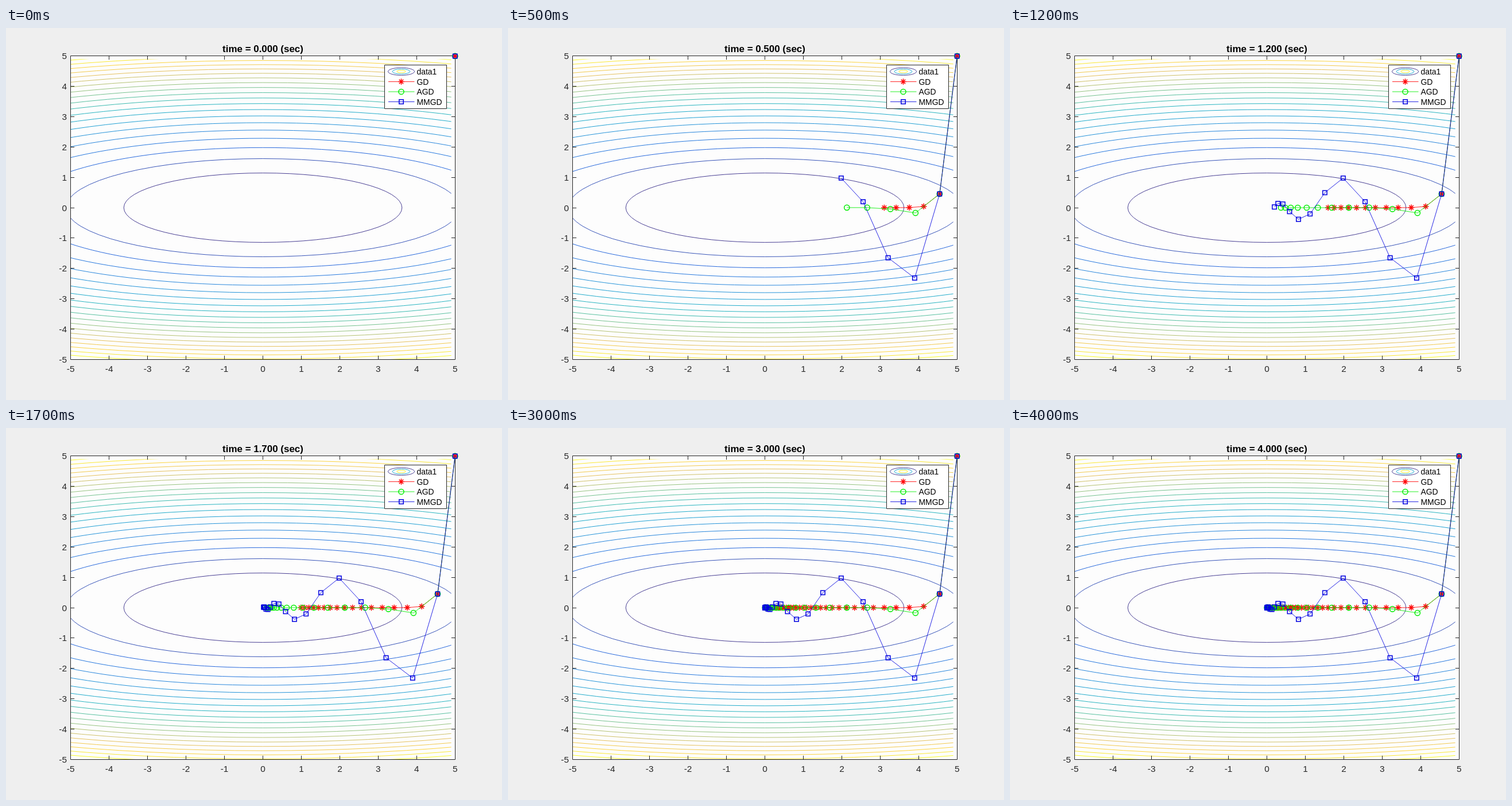
An HTML page with a canvas that plays this animation: 864 px wide and 648 px high, repeating every 4100 ms.

```html
<!DOCTYPE html>
<html lang="en">
<head>
<meta charset="utf-8">
<title>Gradient descent paths</title>
<style>
  html, body { margin: 0; width: 864px; height: 648px; overflow: hidden; background: #efefef; }
  canvas { display: block; }
</style>
</head>
<body>
<canvas id="stage" width="864" height="648"></canvas>
<script>
const STEP_MS = 100, STEPS = 41;
const FONT = '"Liberation Sans", Arial, sans-serif';
const BOX = { left: 112.5, right: 782.5, top: 48.5, bottom: 577.5 };
const AXIS = '#262626';
const RED = '#ff0000', GREEN = '#00ee00', BLUE = '#0000e0';
const PARULA = [
  [53, 42, 135], [15, 92, 221], [18, 125, 216], [7, 156, 207], [21, 177, 180],
  [89, 189, 140], [165, 190, 107], [225, 185, 82], [252, 206, 46], [249, 251, 14]
];

const SX = 66.96, SY = 52.81;
const px = x => 447.5 + SX * x;
const py = y => 313 - SY * y;

const stage = document.getElementById('stage').getContext('2d');
const backdrop = document.createElement('canvas');
backdrop.width = 864;
backdrop.height = 648;

// f(x, y) = x²/2 + 5y², minimised with step 1/11 from (5, 5)
const CURVE = [1, 10], RATE = 1 / 11;
const BETA = (Math.sqrt(10) - 1) / (Math.sqrt(10) + 1);

function descend(next) {
  const path = [[5, 5]];
  for (let k = 1; k < STEPS; k++) {
    const now = path[k - 1], before = path[Math.max(k - 2, 0)];
    path.push(now.map((v, i) => next(v, v - before[i], 1 - RATE * CURVE[i])));
  }
  return path.map(([x, y]) => [px(x), py(y)]);
}

const star = (c, x, y) => {
  for (let i = 0; i < 4; i++) {
    const dx = 5.2 * Math.cos(i * Math.PI / 4), dy = 5.2 * Math.sin(i * Math.PI / 4);
    c.moveTo(x - dx, y - dy);
    c.lineTo(x + dx, y + dy);
  }
};
const ring = (c, x, y) => {
  c.moveTo(x + 4.6, y);
  c.arc(x, y, 4.6, 0, 2 * Math.PI);
};
const square = (c, x, y) => c.rect(x - 3.7, y - 3.7, 7.4, 7.4);

const series = [
  { name: 'GD', color: RED, mark: star, path: descend((v, d, s) => s * v) },
  { name: 'AGD', color: GREEN, mark: ring, path: descend((v, d, s) => s * (v + BETA * d)) },
  { name: 'MMGD', color: BLUE, mark: square, path: descend((v, d, s) => s * v + BETA * d) }
];

function stroke(c, color, width, trace) {
  c.strokeStyle = color;
  c.lineWidth = width;
  c.beginPath();
  trace();
  c.stroke();
}

function plot(c, { color, mark }, line, marks) {
  stroke(c, color, 0.85, () => line.forEach(p => c.lineTo(...p)));
  stroke(c, color, 1.5, () => marks.forEach(p => mark(c, ...p)));
}

function label(c, text, x, y, size, align, weight = '') {
  c.font = `${weight} ${size}px ${FONT}`;
  c.textAlign = align;
  c.fillText(text, x, y);
}

function parula(t) {
  const pos = t * (PARULA.length - 1), i = Math.min(Math.floor(pos), PARULA.length - 2);
  const rgb = PARULA[i].map((v, j) => Math.round(v + (PARULA[i + 1][j] - v) * (pos - i)));
  return `rgb(${rgb})`;
}

function drawContours(c) {
  c.save();
  c.beginPath();
  c.rect(px(-5), py(4.9), 9.9 * SX, 9.9 * SY);
  c.clip();
  for (let k = 1; k <= 20; k++) {
    const level = 137.5 / 21 * k;
    stroke(c, parula((k - 1) / 19), 0.9, () =>
      c.ellipse(px(0), py(0), SX * Math.sqrt(2 * level), SY * Math.sqrt(level / 5), 0, 0, 2 * Math.PI));
  }
  c.restore();
}

function drawAxes(c) {
  const { left, right, top, bottom } = BOX;
  const snap = v => Math.floor(v) + 0.5;
  stroke(c, AXIS, 1, () => {
    c.rect(left, top, right - left, bottom - top);
    for (let v = -4; v <= 4; v++) {
      const x = snap(px(v)), y = snap(py(v));
      for (const [x1, y1, x2, y2] of [
        [x, bottom, x, bottom - 6.7], [x, top, x, top + 6.7],
        [left, y, left + 6.7, y], [right, y, right - 6.7, y]
      ]) {
        c.moveTo(x1, y1);
        c.lineTo(x2, y2);
      }
    }
  });
  c.fillStyle = AXIS;
  for (let v = -5; v <= 5; v++) {
    label(c, v, px(v), 598.5, 15.4, 'center');
    label(c, v, 106, py(v) + 5.5, 15.4, 'right');
  }
}

function drawLegend(c) {
  c.fillStyle = '#fff';
  c.fillRect(659, 64, 108, 76);
  stroke(c, AXIS, 1, () => c.rect(659.5, 64.5, 108, 76));
  [0, 0.35, 0.95].forEach((t, i) => stroke(c, parula(t), 0.9, () =>
    c.ellipse(688.5, 75.8, 23 - 7.6 * i, 6.6 - 2.2 * i, 0, 0, 2 * Math.PI)));
  series.forEach((s, i) => {
    const y = 93.5 + 17.5 * i;
    plot(c, s, [[666, y], [711.5, y]], [[688.5, y]]);
  });
  c.fillStyle = '#000';
  ['data1', ...series.map(s => s.name)].forEach((name, i) =>
    label(c, name, 715.5, 81 + 17.6 * i, 13.9, 'left'));
}

function drawBackdrop(c) {
  c.fillStyle = '#efefef';
  c.fillRect(0, 0, 864, 648);
  c.fillStyle = '#fdfdfd';
  c.fillRect(BOX.left, BOX.top, BOX.right - BOX.left, BOX.bottom - BOX.top);
  drawContours(c);
  drawAxes(c);
  drawLegend(c);
}

function draw(k) {
  stage.drawImage(backdrop, 0, 0);
  for (const s of series) {
    const points = s.path.slice(0, k + 1);
    plot(stage, s, points, points);
  }
  stage.fillStyle = '#000';
  label(stage, `time = ${(k * STEP_MS / 1000).toFixed(3)} (sec)`, 447.5, 42.3, 16.95, 'center', 'bold');
}

drawBackdrop(backdrop.getContext('2d'));
draw(0);

const start = performance.now();
let shown = 0;
function tick() {
  const k = Math.floor((performance.now() - start) / STEP_MS) % STEPS;
  if (k !== shown) draw(shown = k);
  requestAnimationFrame(tick);
}
requestAnimationFrame(tick);
</script>
</body>
</html>
```
